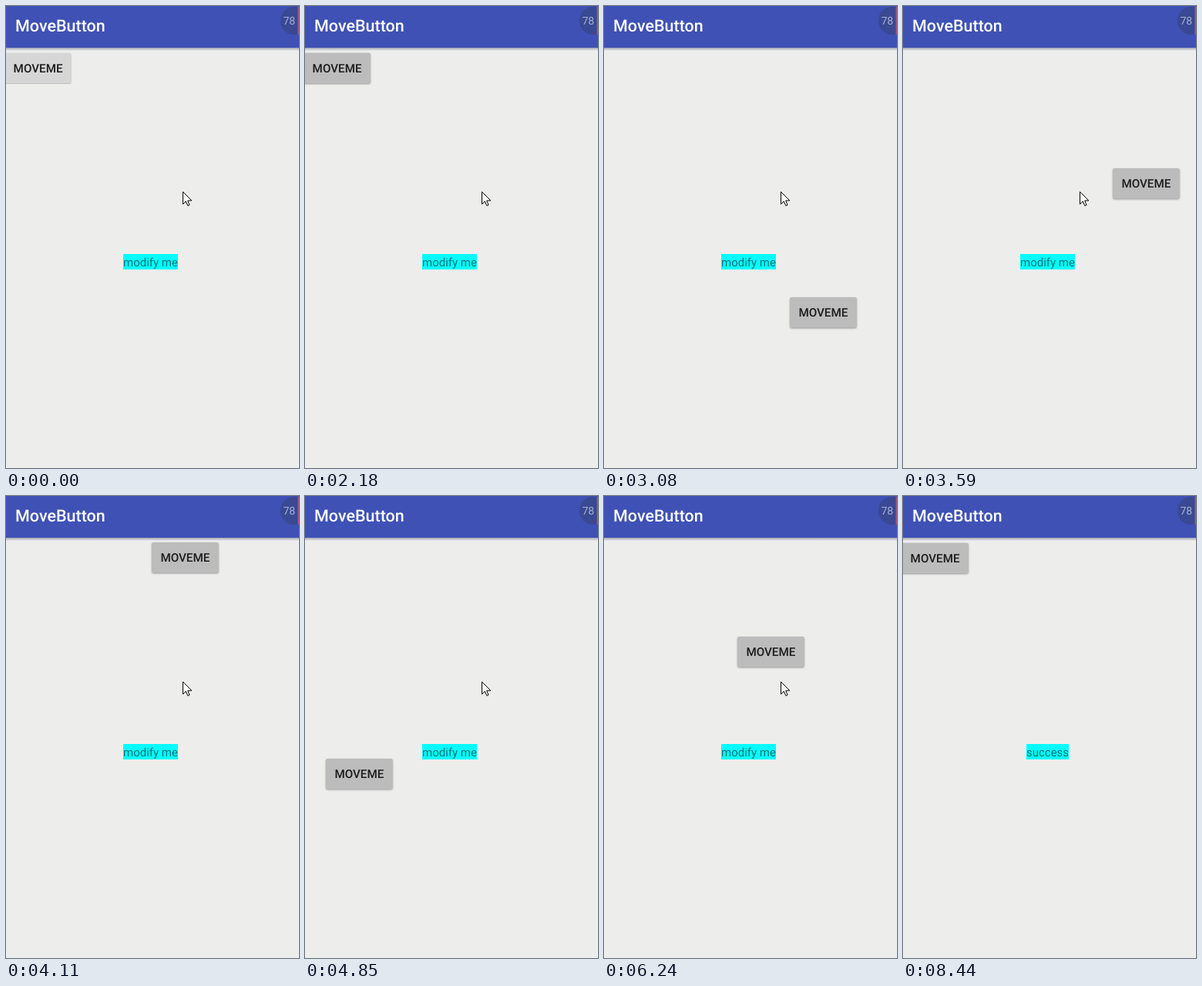
Animation, 380 px wide and 598 px high, one loop 9160 ms. Source, as an HTML page:

```html
<!DOCTYPE html>
<html lang="en">
<head>
<meta charset="utf-8">
<title>MoveButton</title>
<style>
  html, body { margin: 0; width: 100%; height: 100%; overflow: hidden; background: #ededec; }
  svg { display: block; width: 100%; height: 100%; font-family: Roboto, sans-serif; }
  .medium { font-weight: 500; }
  #face { fill: #d6d6d6; filter: drop-shadow(0 1px 0.5px rgba(0,0,0,.18)); }
  .pressed #face { fill: #bcbcbd; filter: drop-shadow(0 1px 1.2px rgba(0,0,0,.36)); }
</style>
</head>
<body>
<svg viewBox="0 0 380 598" text-rendering="geometricPrecision">
  <defs>
    <linearGradient id="shade" x2="0" y2="1">
      <stop stop-color="#9fa2b3"/>
      <stop offset="1" stop-color="#ededec"/>
    </linearGradient>
  </defs>
  <rect width="380" height="598" fill="#ededec"/>
  <rect y="54" width="380" height="4" fill="url(#shade)"/>
  <rect width="380" height="54" fill="#3f51b5"/>
  <text class="medium" x="12" y="33" font-size="21.5" fill="#fff">MoveButton</text>
  <circle cx="374" cy="19" r="18.3" fill="#394994"/>
  <path d="M379.2 1V37" stroke="#a0557c" stroke-width="1.6"/>
  <text x="359.5" y="24.3" font-size="14" fill="#a9b0d2">78</text>

  <rect id="box" y="321" height="20" fill="#0ff"/>
  <text id="label" x="187.5" y="336.6" font-size="15" text-anchor="middle" fill-opacity=".54"></text>

  <g id="button">
    <rect id="face" x=".2" width="86.4" height="39.2" rx="2"/>
    <text class="medium" x="43.4" y="25.2" font-size="15.2" text-anchor="middle" fill="#1c1c1c">MOVEME</text>
  </g>
  <path id="cursor" d="M.5 .5V16.5L4.3 12.8L6.8 18.5L9 17.6L6.7 11.9H11.8Z" fill="#fff" stroke="#000"/>
</svg>
<script>
const LOOP = 9160, PRESS = 2180, DROP = 6830, HIDE = 8440, TICK = 135;

// key points: [time, x, y]
const home = [0, -1.8, 60.8];
const drag = [
  [PRESS, -1.8, 60.8], [2430, 4, 213], [2690, 57, 402], [2930, 162, 436],
  [3080, 241, 377], [3590, 272, 210], [3830, 197, 87], [4110, 189, 60],
  [4390, 151, 105], [4700, 41, 296], [4850, 27, 340], [5000, 25, 377],
  [5420, 149, 484], [5690, 215, 370], [6090, 173, 182]
];
const pointer = [[8040, 229, 240], [8290, 217, 305]];

const get = id => document.getElementById(id);
const button = get("button"), cursor = get("cursor"), label = get("label"), box = get("box");

// Smooth curve through the keys, at rest at both ends and sampled about every TICK ms
function along(keys, t) {
  const last = keys.length - 1, i = keys.findLastIndex(k => k[0] <= t);
  if (i < 0) return keys[0];
  if (i === last) return keys[last];
  const a = keys[i], b = keys[i + 1], span = b[0] - a[0];
  const ticks = Math.round(span / TICK);
  const u = Math.floor((t - a[0]) / span * ticks) / ticks, v = 1 - u;
  const slope = (j, c) => j === 0 || j === last ? 0 :
    (keys[j + 1][c] - keys[j - 1][c]) / (keys[j + 1][0] - keys[j - 1][0]) * span;
  const mix = c => v * v * (1 + 2 * u) * a[c] + u * u * (3 - 2 * u) * b[c]
    + u * v * (v * slope(i, c) - u * slope(i + 1, c));
  return [t, mix(1), mix(2)];
}

function place(el, [, x, y]) {
  el.setAttribute("transform", `translate(${x} ${y})`);
}

function draw(t) {
  const done = t >= DROP, width = done ? 55 : 71;
  place(button, done ? home : along(drag, t));
  place(cursor, along(pointer, t));
  cursor.style.opacity = t < HIDE ? 1 : 0;
  button.classList.toggle("pressed", t >= PRESS);
  label.textContent = done ? "success" : "modify me";
  box.setAttribute("x", 187.5 - width / 2);
  box.setAttribute("width", width);
}

const start = performance.now();
function tick() {
  draw((performance.now() - start) % LOOP);
  requestAnimationFrame(tick);
}
tick();
</script>
</body>
</html>
```
